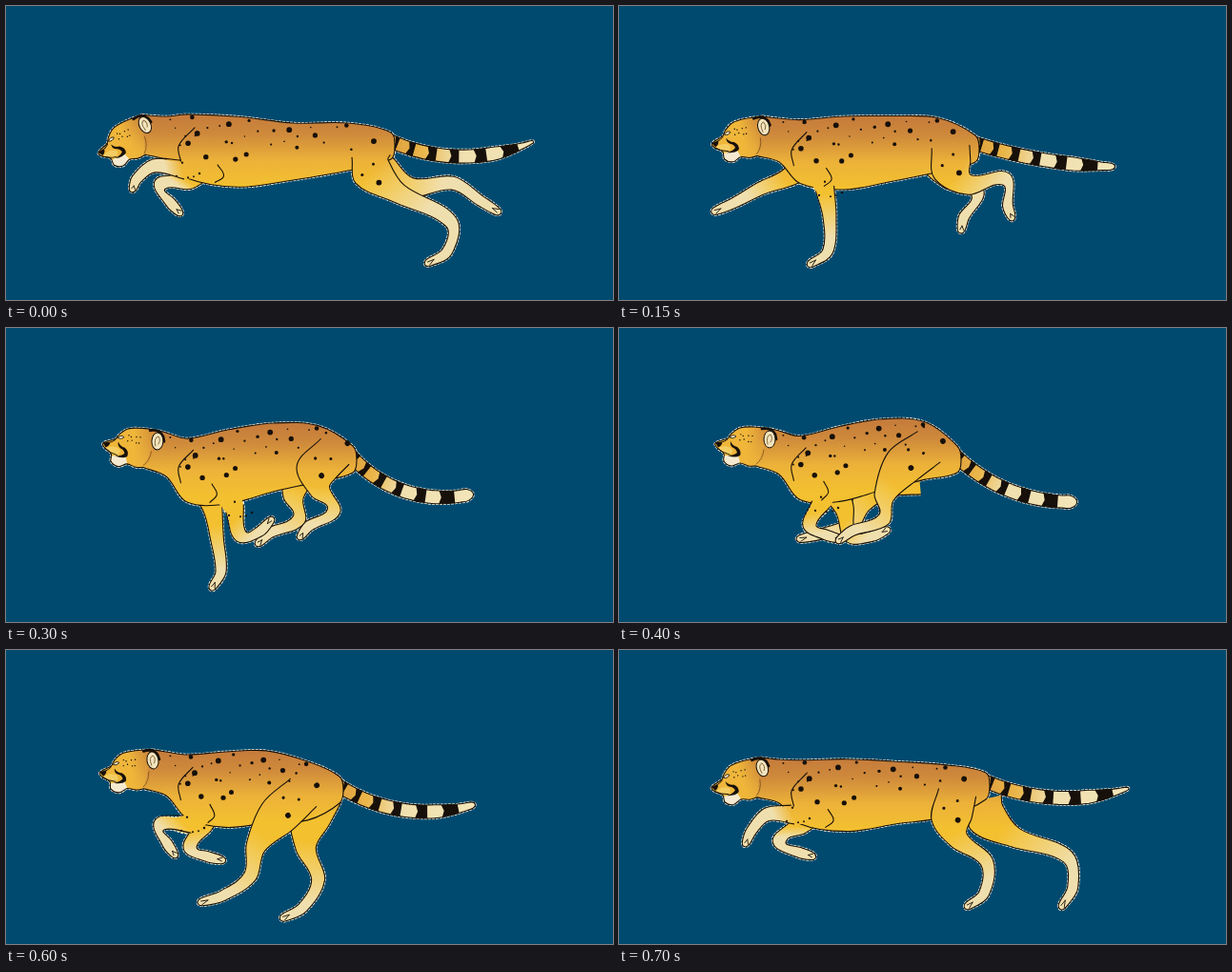
Recreate the animation shown at these times as an HTML page. Size 637 px wide and 309 px high, loop 750 ms.

```html
<!DOCTYPE html>
<html lang="en">
<head>
<meta charset="utf-8">
<title>Running cheetah</title>
<style>
html, body { margin: 0; width: 100%; height: 100%; overflow: hidden; background: #004a70; }
svg { display: block; width: 637px; height: 309px; }
</style>
</head>
<body>
<svg id="stage" viewBox="0 0 637 309"><defs id="defs"></defs></svg>
<script>
const LOOP = 750, STEP = 50;
const INK = '#17100a', CREAM = '#f0dfae', GOLD = '#efb63a';

const nums = s => s.split(' ').map(Number);
const chunk = (a, n) => Array.from({ length: a.length / n }, (_, i) => a.slice(i * n, i * n + n));
const range = (n, f) => Array.from({ length: n }, (_, i) => f(i));
const mix = (a, b, k) => a + (b - a) * k;
const mixAll = (a, b, k) => a.map((v, i) => mix(v, b[i], k));
const fix = p => p[0].toFixed(1) + ' ' + p[1].toFixed(1);
const wave = (t, peak, times = 1) => Math.cos(2 * Math.PI * times * (t - peak) / LOOP);
const wrap = t => (t % LOOP + LOOP) % LOOP;

// Few values drive the trunk, head and tail; everything else follows from them.
const beats = [0, 150, 300, 400, 500, 600, 700];
const tracks = {
  headY: [125, 127, 119, 117, 121, 116, 124],
  tilt: [-27, -14, 2, 0, 0, -9, -17],
  loin: [153, 150, 136, 133, 140, 144, 150],
  croup: [148, 146, 132, 129, 147, 148, 148],
  rumpX: [404, 374, 364, 355, 350, 350, 385],
  rumpY: [147, 150, 138, 138, 156, 147, 143],
  tailRoot: [26, 18, 51, 46, 31, 35, 25],
  tailTip: [-23, 2, -11, 0, 3, -16, -17]
};

// One stride per leg pair: the far leg repeats it with a phase shift.
const stride = (widths, keys) => ({
  widths,
  times: Object.keys(keys).map(Number),
  joints: Object.values(keys).map(s => chunk(nums(s), 2))
});
const strides = {
  fore: stride([36, 20, 14, 11, 8], {
    0: '205 160 185 172 155 168 137 182 133 192',
    50: '195 162 177 182 150 199 118 214 92 218',
    150: '205 165 216 192 221 222 219 258 201 271',
    200: '208 165 215 191 219 221 217 258 204 271',
    300: '222 160 240 190 247 219 266 214 278 202',
    400: '215 160 212 185 200 208 216 217 232 222',
    500: '205 165 188 186 172 205 195 212 210 213',
    600: '205 165 190 183 161 184 169 203 177 215',
    700: '205 165 182 173 155 173 139 190 133 203'
  }),
  hind: stride([40, 42, 21, 14, 11, 8], {
    0: '383 158 384 174 412 197 467 227 463 258 443 270',
    85: '378 155 402 178 435 190 478 185 510 200 530 210',
    150: '348 148 350 172 368 188 406 182 408 210 412 222',
    300: '345 130 325 152 330 172 344 192 318 208 309 219',
    400: '325 125 298 145 278 178 278 201 245 213 231 223',
    500: '315 155 278 158 254 185 246 204 212 216 190 221',
    600: '312 150 285 175 262 207 256 238 228 258 205 265',
    700: '355 150 349 178 357 200 386 223 383 256 366 269'
  })
};
const limbs = {
  farHind: { pair: 'hind', phase: t => t + 78 + 28 * wave(t, 435, 2) },
  farFore: { pair: 'fore', phase: t => t - 135 - 45 * wave(t, 650) },
  nearFore: { pair: 'fore', phase: t => t, from: 1 },
  nearHind: { pair: 'hind', phase: t => t }
};

function span(times, t) {
  let i = times.length - 1;
  while (times[i] > t) i--;
  const j = (i + 1) % times.length;
  return [i, j, (t - times[i]) / ((times[j] || LOOP) - times[i])];
}

// Blends joints by segment length and angle so limbs swing instead of shrinking.
function mixChain(a, b, k) {
  const out = [mixAll(a[0], b[0], k)];
  for (let i = 1; i < a.length; i++) {
    const seg = c => [c[i][0] - c[i - 1][0], c[i][1] - c[i - 1][1]];
    const [ax, ay] = seg(a), [bx, by] = seg(b);
    const from = Math.atan2(ay, ax), turn = Math.atan2(by, bx) - from;
    const ang = from + Math.atan2(Math.sin(turn), Math.cos(turn)) * k;
    const len = mix(Math.hypot(ax, ay), Math.hypot(bx, by), k);
    out.push([out[i - 1][0] + len * Math.cos(ang), out[i - 1][1] + len * Math.sin(ang)]);
  }
  return out;
}

function limbAt({ pair, phase }, t) {
  const { widths, times, joints } = strides[pair];
  const [i, j, k] = span(times, wrap(phase(t)));
  return mixChain(joints[i], joints[j], k).map((p, n) => [...p, widths[n]]);
}

function dirAt(p, i) {
  const a = p[Math.max(i - 1, 0)], b = p[Math.min(i + 1, p.length - 1)];
  const d = Math.hypot(b[0] - a[0], b[1] - a[1]) || 1;
  return [(b[0] - a[0]) / d, (b[1] - a[1]) / d];
}

function spline(p) {
  let d = 'M' + fix(p[0]);
  for (let i = 1; i < p.length; i++) {
    const a = p[i - 1], b = p[i], u = dirAt(p, i - 1), v = dirAt(p, i);
    const h = Math.hypot(b[0] - a[0], b[1] - a[1]) * .33;
    d += 'C' + fix([a[0] + u[0] * h, a[1] + u[1] * h]) + ' ' +
      fix([b[0] - v[0] * h, b[1] - v[1] * h]) + ' ' + fix(b);
  }
  return d;
}

function sides(p) {
  const side = s => p.map((q, i) => {
    const [x, y] = dirAt(p, i);
    return [q[0] - y * q[2] / 2 * s, q[1] + x * q[2] / 2 * s];
  });
  return [side(1), side(-1)];
}

function ribbon(p, start = 0) {
  const [l, r] = sides(p), n = p.length - 1, u = dirAt(p, n), e = p[n];
  const tip = [e[0] + u[0] * e[2] * .5, e[1] + u[1] * e[2] * .5];
  return spline([...l.slice(start), tip, ...r.slice(start).reverse()]);
}

function set(node, attrs) {
  for (const k in attrs) node.setAttribute(k, attrs[k]);
}
function el(tag, attrs, parent) {
  const node = document.createElementNS('http://www.w3.org/2000/svg', tag);
  set(node, attrs);
  return parent.appendChild(node);
}

const stage = document.getElementById('stage'), defs = document.getElementById('defs');
function gradient(id, stops, attrs = {}) {
  const g = el('linearGradient', { id, gradientUnits: 'userSpaceOnUse', ...attrs }, defs);
  for (const [offset, color, alpha = 1] of stops)
    el('stop', { offset, 'stop-color': color, 'stop-opacity': alpha }, g);
  return g;
}
const coat = gradient('coat', [[0, '#c47a3b'], [.28, '#cf8a3b'], [.65, '#ecb239'], [1, '#f3c030']], { x1: 0, x2: 0 });
gradient('face', [[0, GOLD], [.55, GOLD], [1, GOLD, 0]], { x1: -57, x2: 2, y1: 0, y2: 0 });
const tailTint = gradient('tailTint', [[0, '#dd9d3c'], [.25, '#eab64a'], [.48, CREAM], [1, '#f3e5b8']]);

el('rect', { width: 637, height: 309, fill: '#004a70' }, stage);
const line = { fill: 'none', stroke: INK, 'stroke-width': 1.1, 'stroke-linejoin': 'round', 'stroke-linecap': 'round' };
const fine = { ...line, 'stroke-width': .9 };
const halos = el('g', { fill: 'none', stroke: '#f6efdc', 'stroke-width': 2.5, 'stroke-dasharray': '3 1' }, stage);
const parts = {};
for (const name of ['farHind', 'farFore', 'tail', 'body', 'nearFore', 'nearHind', 'head']) {
  const part = parts[name] = { halo: el('path', {}, halos) };
  part.fill = el('path', { fill: name === 'tail' ? 'url(#tailTint)' : 'url(#coat)' }, stage);
  if (limbs[name]) {
    part.tint = gradient('tint-' + name, [[0, CREAM, 0], [1, CREAM]]);
    part.over = el('path', { fill: `url(#tint-${name})` }, stage);
    part.claw = el('path', fine, stage);
  }
  if (name === 'tail') part.bands = el('path', { fill: INK }, stage);
  if (name === 'head') part.face = el('g', {}, stage);
  part.line = el('path', line, stage);
}
const creases = el('path', line, stage);

let seed = 11;
const rnd = (a, b) => {
  seed = seed * 16807 % 2147483647;
  return mix(a, b, seed / 2147483647);
};
const dots = (list, parent) => list.map(([cx, cy, r]) => el('circle', { cx, cy, r }, parent));
const marks = el('g', { fill: INK }, stage);

// Trunk spots: place along the spine, height from -1 (back) to 1 (belly), radius.
const trunkSpots = chunk(nums('1.1 -.92 2.3 1.2 -.43 2.9 1.02 -.1 2.8 1.37 .26 2.7 1.82 -.77 2.9 1.77 -.25 1.7 ' +
  '1.95 .22 2.6 2.15 .08 2.5 2.2 -.92 1.6 2.93 -.75 2.9 3.4 -.54 2.6 2.65 -.68 1.7 3.07 -.13 2 3.97 -.9 2.3'), 3)
  .concat(range(16, i => [.2 + i * .24, rnd(-.85, .2), rnd(.7, 1.3)]));
const trunkDots = dots(trunkSpots, marks);
const haunch = el('g', {}, marks);
dots(chunk(nums('2 -16 2.9 10 27 2.9 3 8 1.5 -8 20 1.6 -21 -6 1.3'), 3), haunch);
const elbow = el('g', {}, marks);
dots(range(5, i => [i * 6 - 6, rnd(-9, 9), rnd(.9, 1.3)]), elbow);

const headShape = chunk(nums('2 -11 -16 -13 -31 -12 -40 -6 -44 -1 -57 4 -55 9 -48 15 -48 23 -40 28 -31 25 -22 28 -14 28'), 2);
const face = parts.head.face;
const draw = (d, attrs) => el('path', { d, ...attrs }, face);
draw(spline(headShape), { fill: 'url(#face)' });
draw('M-48 17Q-50 25 -40 28Q-34 28 -31 24L-33 17Z', { fill: '#f5ead0' });
draw('M-54 9Q-46 5 -39 10Q-38 15 -43 16Q-50 14 -54 9Z', { fill: '#f4cd62' });
draw('M-57 3.5L-50 2.5Q-49 6 -54 8.5Z', { fill: INK });
draw('M-41 2Q-39 7 -34 8Q-29 12 -31 17Q-36 20 -44 17Q-37 17 -34 14Q-35 10 -38 9Q-42 7 -41 2Z', { fill: INK });
draw('M-42 -2Q-38 -6 -35 -3Q-38 0 -42 -2Z', { fill: '#f8edcf', stroke: INK, 'stroke-width': .8 });
draw('M-55 9Q-50 14 -42 16M-44 0Q-48 3 -50 3', fine);
draw('M-6 11Q-7 21 -14 26', { ...fine, stroke: '#8a5a22' });
dots(range(8, i => [-32 + i % 4 * 4 + rnd(0, 2), (i >> 2) * 6 - 5 + rnd(-1, 2), .7]), el('g', { fill: INK }, face));
draw('M-8 -11Q2 -13 6 -5L7 0', { ...line, 'stroke-width': 2.8 });
el('ellipse', { rx: 6, ry: 9, fill: '#f3e4bd', stroke: INK }, face);
draw('M-2 5Q-4 -4 1 -5Q4 -1 1 3', { ...fine, stroke: '#7d6238' });

// Joints x, y, height from the neck to the rump; the trunk thickens as it gathers.
function spineAt(s) {
  const gather = 404 - s.rumpX, withers = s.headY + 30 + .28 * s.tilt;
  const x = f => mix(190, s.rumpX, f);
  return [
    [168, s.headY + 14, 46],
    [x(0), withers, 67],
    [x(.25), (withers + s.loin) / 2 + 3, 74 + gather * .1],
    [x(.52), s.loin, 60 + gather * .3],
    [x(.79), s.croup, 50 + gather * .22],
    [s.rumpX, s.rumpY, 28]
  ];
}

function onSpine(spine, u, v) {
  const i = Math.min(Math.floor(u), spine.length - 2);
  const [x, y, w] = mixAll(spine[i], spine[i + 1], u - i);
  return [x, y + v * w / 2];
}

function drawTrunk(spine, onHead) {
  const edge = v => spine.map((_, i) => onSpine(spine, i, v));
  const [rx, ry] = spine[spine.length - 1];
  const points = [onHead([2, -11]), ...edge(-1), [rx + 4, ry], ...edge(1).reverse(), onHead([-14, 28])];
  const top = Math.min(...points.map(p => p[1])), d = spline(points);
  set(coat, { y1: top, y2: top + 75 });
  set(parts.body.halo, { d });
  set(parts.body.line, { d });
  set(parts.body.fill, { d: d + 'L' + fix(onHead([-20, 5])) + 'Z' });

  const at = ([u, v]) => onSpine(spine, u, v);
  set(creases, { d: spline([[1.15, -.6], [.6, .1], [.7, .6]].map(at)) + spline([[1.6, .45], [1.72, .75], [1.55, .98]].map(at)) });
  trunkSpots.forEach((spot, i) => {
    const [cx, cy] = at(spot);
    set(trunkDots[i], { cx, cy });
  });
}

function drawHead(s) {
  const x = 158 + .45 * s.tilt, a = s.tilt * Math.PI / 180, c = Math.cos(a), n = Math.sin(a);
  const onHead = ([px, py]) => [x + px * c - py * n, s.headY + px * n + py * c];
  const d = spline(headShape.map(onHead));
  for (const key of ['halo', 'fill', 'line']) set(parts.head[key], { d });
  set(face, { transform: `translate(${x} ${s.headY}) rotate(${s.tilt})` });
  return onHead;
}

function drawLimb(name, p, pale) {
  const part = parts[name], d = ribbon(p), n = p.length - 1, a = p[1], b = p[n - 1];
  for (const key of ['halo', 'fill', 'over']) set(part[key], { d });
  set(part.line, { d: ribbon(p, limbs[name].from) });
  set(part.tint, { x1: a[0], y1: a[1], x2: b[0], y2: b[1] });
  set(part.tint.firstChild, { offset: mix(.25, -.3, pale) });
  set(part.tint.lastChild, { offset: mix(.95, .35, pale) });
  const [l, r] = sides(p), toe = p[n];
  const claw = (side, f) => 'M' + fix(mixAll(toe, side[n], f)) + 'L' + fix(mixAll(toe, b, .3));
  set(part.claw, { d: claw(l, .3) + claw(r, .7) });
}

function drawTail(s, t) {
  const n = 60, len = 148 + 10 * wave(t, 0), tip = 8 - 5 * wave(t, 0);
  const p = [[s.rumpX - 5, s.rumpY - 7, 14]];
  for (let i = 1; i <= n; i++) {
    const u = i / n, a = mix(s.tailRoot, s.tailTip, u) * Math.PI / 180, [x, y] = p[i - 1];
    p.push([x + len / n * Math.cos(a), y + len / n * Math.sin(a), mix(14, tip, Math.max(0, u * 4 - 3))]);
  }
  const d = ribbon(p.filter((_, i) => i % 4 === 0)), part = parts.tail;
  for (const key of ['halo', 'fill', 'line']) set(part[key], { d });
  const [l, r] = sides(p);
  set(part.bands, { d: range(6, i => {
    const mid = .07 + .1 * i + .0107 * i * i, half = .02 + .007 * i;
    const a = Math.round((mid - half) * n), b = Math.round((mid + half) * n);
    return 'M' + [...l.slice(a, b + 1), p[b], ...r.slice(a, b + 1).reverse(), p[a + 1]].map(fix).join('L') + 'Z';
  }).join('') });
  set(tailTint, { x1: p[0][0], y1: p[0][1], x2: p[n][0], y2: p[n][1] });
}

function render(t) {
  const [i, j, k] = span(beats, t), s = {};
  for (const key in tracks) s[key] = mix(tracks[key][i], tracks[key][j], k);

  drawTrunk(spineAt(s), drawHead(s));
  drawTail(s, t);

  const pale = { fore: Math.max(0, wave(t, 0)), hind: Math.max(0, wave(t, 60)) ** 4 };
  const pose = {};
  for (const name in limbs) {
    pose[name] = limbAt(limbs[name], t);
    drawLimb(name, pose[name], pale[limbs[name].pair]);
  }
  const [hip, thigh] = pose.nearHind;
  const turn = Math.atan2(thigh[1] - hip[1], thigh[0] - hip[0]) * 180 / Math.PI - 83;
  set(haunch, { transform: `translate(${fix(hip)}) rotate(${turn})` });
  set(elbow, { transform: `translate(${fix(pose.nearFore[1])})` });
}

const begin = performance.now();
function tick(now) {
  const t = Math.max(0, now - begin) % LOOP;
  render(Math.floor(t / STEP) * STEP);
  requestAnimationFrame(tick);
}
render(0);
requestAnimationFrame(tick);
</script>
</body>
</html>
```
